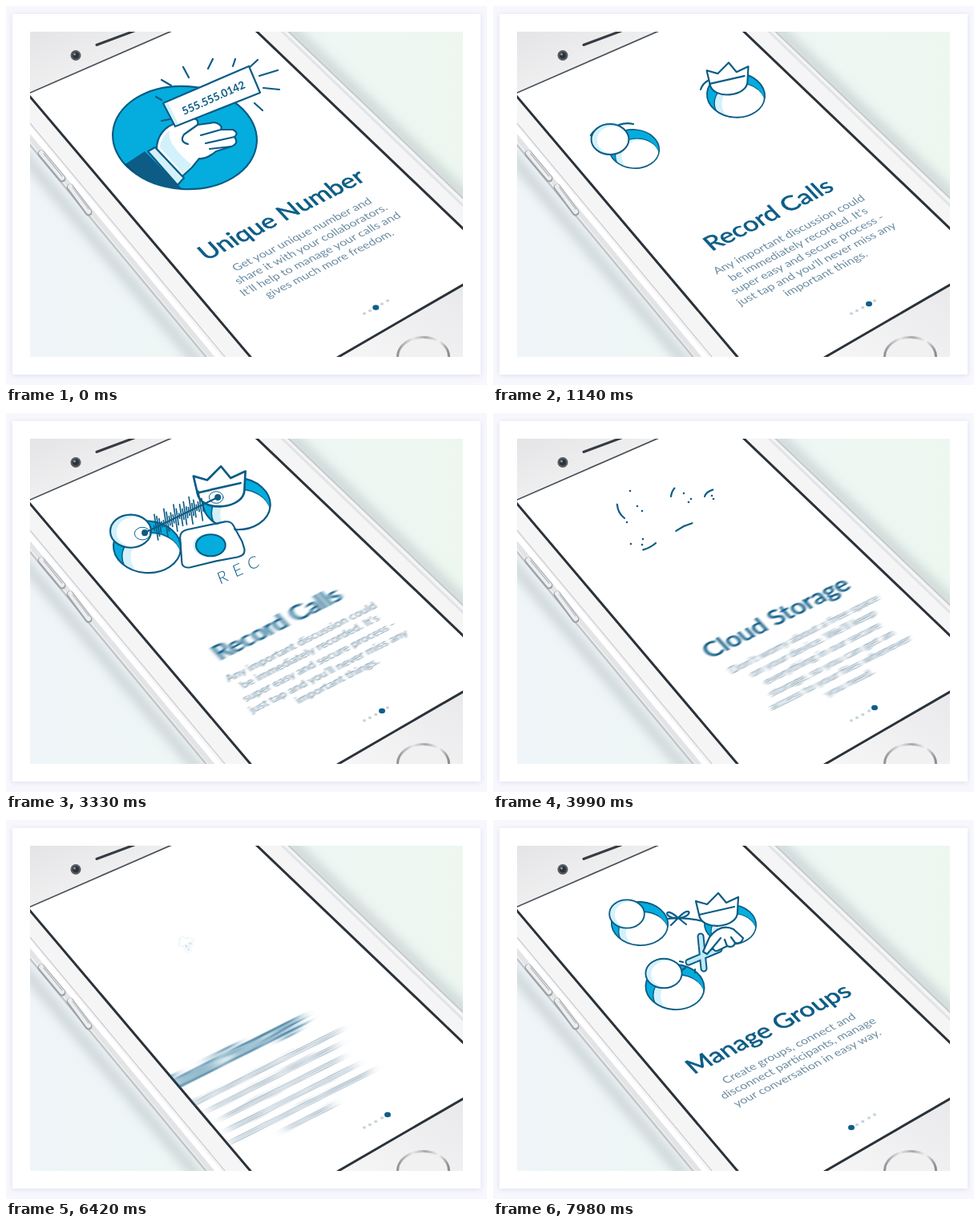
Animation, 600 px wide and 472 px high, one loop 8000 ms. Source, as an HTML page:

```html
<!DOCTYPE html>
<html lang="en">
<head>
<meta charset="utf-8">
<title>Onboarding screens</title>
<style>
html, body { margin: 0; width: 100%; height: 100%; overflow: hidden; background: #f7f7fd; }
svg { display: block; width: 600px; height: 472px; font-family: Lato, "Open Sans", sans-serif; }
.ink { stroke: #0c5c86; stroke-width: 2.2; stroke-linecap: round; stroke-linejoin: round; }
.none { fill: none; }
.white { fill: #fff; }
.pale { fill: #d3f1fa; }
.cyan { fill: #04addd; }
.dark { fill: #0c5c86; }
.title { font-size: 32px; fill: #0c5c86; stroke: #0c5c86; stroke-width: .7; text-anchor: middle; }
.copy { font-size: 15.2px; fill: #6b8ca2; text-anchor: middle; }
</style>
</head>
<body>
<svg viewBox="0 0 600 472" xmlns="http://www.w3.org/2000/svg">
<defs>
  <clipPath id="photo"><rect x="30" y="32" width="540" height="405"/></clipPath>
  <clipPath id="screen"><path d="M30 108 205 32H313L570 277V347L415 437H305L30 113Z"/></clipPath>
  <clipPath id="round"><ellipse rx="43" ry="33" transform="rotate(4)"/></clipPath>
  <clipPath id="disc"><ellipse rx="90" ry="64" transform="translate(223 164) rotate(4)"/></clipPath>
  <linearGradient id="desk"><stop stop-color="#eff5f8"/><stop offset="1" stop-color="#edf7f0"/></linearGradient>
  <linearGradient id="bezel" x1="0" y1="0" x2="1" y2="1"><stop stop-color="#e4e4e6"/><stop offset=".6" stop-color="#f1f1f2"/></linearGradient>
  <linearGradient id="chin" x1="0" y1="1" x2="1" y2="0"><stop stop-color="#f6f6f7"/><stop offset="1" stop-color="#e9e9eb"/></linearGradient>
  <linearGradient id="ring"><stop stop-color="#8f9397"/><stop offset=".3" stop-color="#e6e7e8"/><stop offset=".55" stop-color="#a4a8ab"/><stop offset=".8" stop-color="#f4f4f4"/><stop offset="1" stop-color="#85898d"/></linearGradient>
  <filter id="soft" x="-20%" y="-20%" width="140%" height="140%"><feGaussianBlur stdDeviation="7"/></filter>
  <filter id="lift"><feDropShadow dx="0" dy="1" stdDeviation="3" flood-color="#cfd3e6" flood-opacity=".7"/></filter>

  <g id="body">
    <ellipse class="cyan" rx="43" ry="33" transform="rotate(4)"/>
    <g clip-path="url(#round)">
      <ellipse class="ink pale" cx="5" cy="12" rx="37" ry="30" style="stroke-width:1.6"/>
      <ellipse class="white" cx="11" cy="13" rx="32" ry="28"/>
    </g>
    <ellipse class="ink none" rx="43" ry="33" transform="rotate(4)"/>
  </g>
  <g id="head">
    <ellipse class="pale" rx="26" ry="21"/>
    <ellipse class="white" cx="4" cy="1" rx="22" ry="19"/>
    <ellipse class="ink none" rx="26" ry="21"/>
  </g>
  <g id="king">
    <path class="ink white" d="M-24 5-28-12-14-8 0-22 10-10 25-17 24 1C25 22-21 26-24 5Z"/>
    <path class="ink none" d="M-24 5 20-5"/>
  </g>
</defs>

<rect width="600" height="472" fill="#f7f7fd"/>
<rect x="8" y="10" width="584" height="449" fill="#fff" filter="url(#lift)"/>

<g clip-path="url(#photo)">
  <rect x="30" y="32" width="540" height="405" fill="url(#desk)"/>
  <path d="M10 172 255 462M350 24 590 254" stroke="#aeb7bd" stroke-width="12" fill="none" opacity=".6" filter="url(#soft)"/>
  <path d="M20 20H340L580 249V450H262L20 160Z" fill="#f5f5f6"/>
  <g fill="none">
    <path d="M20 161 262 452" stroke="#c3c6c9" stroke-width="2.5"/>
    <path d="M20 152 268 451" stroke="#e3e4e6" stroke-width="6"/>
    <path d="M20 142 277 452" stroke="#fff" stroke-width="6"/>
    <path d="M20 134 284 450" stroke="#c9ccd0" stroke-width="1.2"/>
    <path d="M340 20 580 249" stroke="#c5cacd" stroke-width="2"/>
    <path d="M332 20 580 258" stroke="#e1e4e6" stroke-width="3"/>
  </g>
  <g stroke-linecap="round">
    <path d="M44 184 70 215M80 226 103 257" stroke="#9ea3a7" stroke-width="9"/>
    <path d="M44 183 70 214M80 225 103 256" stroke="#eceeef" stroke-width="6"/>
    <path d="M47 184 70 212M83 226 103 253" stroke="#b5b9bd" stroke-width="1.2"/>
  </g>
  <path d="M30 32H205L30 108Z" fill="url(#bezel)"/>
  <path d="M415 437 570 347V437Z" fill="url(#chin)"/>
  <path d="M30 108 205 32H313L570 277V347L415 437H305L30 113Z" fill="#fff"/>
  <path d="M28 110.600 307 439.500M311 30 572 279M413 438 572 346" stroke="#2a323a" stroke-width="3" fill="none"/>
  <path d="M28 109 207 31" stroke="#4a525a" stroke-width="1.800"/>
  <path d="M113 48.500 160 31" stroke="#363c42" stroke-width="3" stroke-linecap="round"/>
  <circle cx="87" cy="61.500" r="6.500" fill="#555b61"/>
  <circle cx="87" cy="61.500" r="4" fill="#2d3338"/>
  <circle cx="85.500" cy="60" r="1.500" fill="#8e99a2"/>
  <ellipse cx="520.500" cy="437" rx="32" ry="24.500" fill="#f1f1f2" stroke="url(#ring)" stroke-width="3"/>

  <g clip-path="url(#screen)">
    <g id="copy"></g>
    <g id="dots"></g>

    <g id="card">
      <g class="ink none" id="burst"></g>
      <ellipse class="ink cyan" rx="90" ry="64" transform="translate(223 164) rotate(4)"/>
      <g clip-path="url(#disc)">
        <path class="dark" d="M135 206 173 181 220 228 200 245 145 230Z"/>
        <path d="M135 206 150 196 192 240 150 235Z" fill="#084a70"/>
      </g>
      <path class="ink pale" d="M177 181 186 176 222 214 214 223Z"/>
      <path class="ink white" d="M188 178C188 162 198 150 212 146L232 140Q241 140 239 148L260 145Q271 148 268 154L283 154Q291 158 285 163Q291 171 281 175L262 181Q250 191 241 190L232 201 220 212Z"/>
      <path class="pale" d="M192 176Q193 163 204 155Q200 172 232 198L221 209Z"/>
      <path class="ink none" d="M239 148 222 160Q216 169 227 172M268 154 243 161M285 163 249 171M281 175 254 178"/>
      <path class="ink white" d="M196 121 303 75 317 108 211 150Z"/>
      <path class="pale" d="M198 122 202 120 215 147 212 148Z"/>
      <text class="dark" transform="translate(222 136) rotate(-24)" font-size="13.500" font-weight="700">555.555.0142</text>
      <path class="ink none" d="M194 143 204 141M187 113 194 117" />
    </g>

    <g id="rec">
      <g class="ink none" data-t="900,1000,1300,1450"><path d="M157 148Q166 145 175 147M122 161 125 157M259 104Q261 97 268 93"/></g>
      <use href="#body" id="b1"/><use href="#head" id="h1"/>
      <use href="#body" id="b2"/><use href="#king" id="h2"/>
      <g class="ink" data-t="1600,1800">
        <path class="none" d="M172 149 265 104"/>
        <path id="wave" class="none" style="stroke-width:1.700"/>
        <ellipse class="none" cx="169" cy="150" rx="10" ry="8" style="stroke-width:1"/>
        <ellipse class="none" cx="263" cy="104" rx="9" ry="7.500" style="stroke-width:1"/>
        <circle class="dark" cx="172" cy="149" r="3"/><circle class="dark" cx="265" cy="104" r="3"/>
      </g>
      <path class="white" data-t="1650,1800" d="M218 147 282 135 298 178 221 194Z"/>
      <path class="ink none" data-pen="1650,2260" d="M263 185 230 193Q219 195 219 184L217 155Q217 147 226 145L274 135Q282 134 285 140L296 160 299 170Q300 178 290 180Z"/>
      <g id="lamp"><ellipse class="pale" cx="-3" rx="20" ry="15"/><ellipse class="ink cyan" rx="19" ry="14"/></g>
      <text class="dark" data-t="1850,2050" transform="matrix(.9 -.42 .36 .93 268 215)" font-size="21" font-weight="300" letter-spacing="9">REC</text>
    </g>

    <g id="cloud">
      <g id="c3"><path class="ink white" d="M-16-8 18-20 20 17-16 24Z"/><rect class="dark" x="-12" y="-7" width="18" height="18" transform="rotate(-18)"/></g>
      <g id="c1"><path class="ink white" d="M-27-14 23-27 25 17-24 26Z"/><rect id="chip" class="cyan" x="-11" y="-11" width="22" height="22"/></g>
      <g id="c2"><path class="ink white" d="M-26-13 22-31 25 19-22 27Z"/><rect class="dark" x="-10" y="-5" width="20" height="20" transform="rotate(-16)"/></g>
      <g data-t="4150,4500">
        <path class="pale" d="M178 172C160 175 146 164 147 150C148 138 157 132 164 131C150 120 152 98 170 87C190 77 214 85 220 100C226 86 252 81 263 100C272 92 292 92 298 102C303 112 296 119 288 123L203 161Z"/>
        <path class="white" d="M184 167C162 170 154 156 160 143Q166 133 176 133C158 118 162 96 182 89C202 82 216 92 222 108C230 90 254 86 264 104C274 94 290 94 297 103C302 112 296 117 287 122L203 160Z"/>
        <path class="ink none" style="stroke-dasharray:9 4 14 4" d="M167 117C161 103 171 94 187 92M160 161Q153 150 164 141M230 107Q230 96 243 94M272 107Q272 101 280 100"/>
      </g>
      <g class="ink none">
        <path data-pen="3800,4500" d="M164 131C150 120 152 98 170 87C190 77 214 85 220 100"/>
        <path data-pen="3800,4450" d="M222 104C224 84 252 81 263 100"/>
        <path data-pen="3800,4450" d="M264 104C268 92 292 92 298 102C303 112 296 119 288 123"/>
        <path data-pen="3800,4500" d="M203 162C185 178 147 176 147 150C148 138 157 132 164 131"/>
        <path data-pen="3800,4350" d="M238 141 203 162"/>
        <path data-pen="3800,4450" d="M238 141 288 123"/>
        <path data-t="5080,5200,5350,5500" d="M199 237V240M222 243V250"/>
      </g>
      <g id="specks" class="dark" data-t="3800,3930,4080,4250"></g>
    </g>

    <g id="group">
      <g class="ink none" data-t="7350,7500">
        <path d="M212 124Q236 119 266 127M231 122 222 131M231 122 241 130"/>
        <path class="pale" d="M231 122C213 105 212 124 231 122C247 104 251 121 231 122Z"/>
      </g>
      <use href="#body" id="b3"/><use href="#head" id="h3"/>
      <use href="#body" id="b4"/><use href="#head" id="h4"/>
      <use href="#body" id="b5"/><use href="#king" id="h5"/>
      <g id="snip">
        <g fill="none" stroke-linecap="round">
          <path d="M18-3-20 13M-5-19-1 21" stroke="#0c5c86" stroke-width="9"/>
          <path d="M18-3-20 13M-5-19-1 21" stroke="#bfeaf6" stroke-width="5"/>
        </g>
        <path class="ink white" d="M-2 0 6-18Q20-36 36-28L48-17Q46-9 38-11Q36-4 28-7L18-2Q12 1 10-5L3 3Z"/>
        <path class="ink none" d="M10-5 20-17M28-7 25-15M38-11 33-18M-24 20-28 23M-27 13-31 12M-12 22-12 26"/>
      </g>
    </g>
  </g>
</g>
</svg>

<script>
const LOOP = 8000;
const SVG = "http://www.w3.org/2000/svg";
const $ = id => document.getElementById(id);
const ramp = (t, a, b) => Math.min(1, Math.max(0, (t - a) / (b - a)));
const smooth = p => p * p * (3 - 2 * p);

function make(parent, tag, attrs, text) {
  const el = document.createElementNS(SVG, tag);
  for (const k in attrs) el.setAttribute(k, attrs[k]);
  if (text) el.textContent = text;
  return parent.appendChild(el);
}

const pages = [
  { dot: 2, from: -3000, to: 30, title: "Unique Number", lines: ["Get your unique number and", "share it with your collaborators.", "It’ll help to manage your calls and", "gives much more freedom."] },
  { dot: 3, from: 30, to: 3270, title: "Record Calls", lines: ["Any important discussion could", "be immediately recorded. It’s", "super easy and secure process -", "just tap and you’ll never miss any", "important things."] },
  { dot: 4, from: 3270, to: 6210, title: "Cloud Storage", lines: ["Don’t worry about a free space", "on your device. We’ll keep", "everything in our secure", "storage, so you can get an", "access to your files whenever", "you need."] },
  { dot: 0, from: 6210, to: 12000, title: "Manage Groups", lines: ["Create groups, connect and", "disconnect participants, manage", "your conversation in easy way."] }
];

// Each page has a title block and a copy block that slides a little later.
const blocks = [];
function addBlock(page, lag, cls, lines, y) {
  const id = "blur" + blocks.length;
  const filter = make(document.querySelector("defs"), "filter", { id, x: "-30%", y: "-20%", width: "160%", height: "140%" });
  const blur = make(filter, "feGaussianBlur", { stdDeviation: "0 0" });
  const el = make($("copy"), "g", { class: cls });
  lines.forEach((s, i) => make(el, "text", { x: lag * 2, y: y + 19 * i }, s));
  blocks.push({ page, lag, id, blur, el });
}
for (const p of pages) {
  addBlock(p, 0, "title", [p.title], 0);
  addBlock(p, 1, "copy", p.lines, 34);
}

const dots = [[447, 383], [454, 379.5], [461.300, 375.500], [469, 371], [476, 367]]
  .map(([cx, cy]) => make($("dots"), "ellipse", { cx, cy }));

[[194, 92, 206, 99], [221, 76, 228, 89], [252, 78, 258, 66], [283, 75, 286, 66],
 [301, 79, 314, 67], [316, 87, 339, 80], [321, 102, 341, 104], [310, 121, 320, 130]]
  .forEach(([x1, y1, x2, y2]) => make($("burst"), "line", { x1, y1, x2, y2 }));

[[171, 97], [180, 116], [186, 122], [167, 136], [238, 100], [247, 107], [244, 111],
 [273, 103], [275, 107], [172, 163], [187, 157], [186, 164]]
  .forEach(([cx, cy]) => make($("specks"), "circle", { cx, cy, r: 1.300 }));

// time, x, y, scale
const moves = {
  b1: [[750, 176, 182, 0], [1140, 176, 178, .73], [1600, 175, 167, 1]],
  h1: [[780, 160, 176, 0], [1140, 146, 166, .9], [1600, 154, 147, 1]],
  b2: [[750, 303, 116, 0], [1140, 303, 111, .84], [1600, 289, 112, 1]],
  h2: [[780, 298, 104, 0], [1140, 294, 92, .98], [1600, 269, 92, 1.250]],
  lamp: [[1700, 256, 165, 0], [1950, 256, 165, 1.100], [2060, 256, 165, 1]],
  c3: [[4480, 262, 116, .5], [4850, 266, 145, 1]],
  c2: [[4620, 222, 132, .5], [5050, 224, 165, 1]],
  c1: [[4750, 240, 140, .5], [5200, 246, 204, 1]],
  b3: [[6850, 200, 146, 0], [6990, 200, 143, .24], [7500, 183, 129, .82]],
  h3: [[6850, 197, 142, 0], [6990, 196, 138, .24], [7500, 167, 117, .84]],
  b4: [[6700, 242, 220, 0], [6990, 241, 214, .45], [7400, 227, 208, .85]],
  h4: [[6700, 238, 212, 0], [6990, 236, 205, .48], [7400, 213, 191, .87]],
  b5: [[6960, 310, 150, 0], [6990, 310, 150, .08], [7500, 296, 130, .75]],
  h5: [[6960, 309, 149, 0], [6990, 309, 149, .06], [7500, 281, 113, 1]],
  snip: [[7480, 280, 150, 0], [7720, 266, 164, 1.060], [7800, 264, 164, 1]]
};

function pose(keys, t) {
  let i = 0;
  while (i < keys.length - 2 && t > keys[i + 1][0]) i++;
  const a = keys[i], b = keys[i + 1];
  const p = smooth(ramp(t, a[0], b[0]));
  return a.map((v, k) => v + (b[k] - v) * p);
}

const scenes = [["card", -1, 30], ["rec", 700, 3270], ["cloud", 3780, 6030], ["group", 6650, 9000]];
const fades = [...document.querySelectorAll("[data-t]")].map(el => [el, el.dataset.t.split(",").map(Number)]);
const pens = [...document.querySelectorAll("[data-pen]")].map(el => {
  el.setAttribute("pathLength", 1);
  return [el, el.dataset.pen.split(",").map(Number)];
});

function drawCopy(t) {
  for (const { page, lag, id, blur, el } of blocks) {
    const start = page.from + 200 + 50 * lag;
    const p = ramp(t, start, start + 780 + 20 * lag);
    const q = ramp(t, page.to + 30 * lag, page.to + 30 * lag + 430);
    const x = 300 * (1 - p) ** 3 - 300 * q * q;
    const speed = 1.150 * (1 - p) ** 2 + 1.400 * q;
    el.style.display = p > 0 && q < 1 ? "" : "none";
    el.setAttribute("transform", `matrix(.895 -.45 .6 .64 ${350 + x * .895} ${267 - x * .45})`);
    blur.setAttribute("stdDeviation", `${speed * 14} 0`);
    if (speed > .02) el.setAttribute("filter", `url(#${id})`);
    else el.removeAttribute("filter");
  }
  dots.forEach((dot, i) => {
    const on = pages.reduce((sum, p) => sum + (p.dot === i ? ramp(t, p.from + 250, p.from + 450) - ramp(t, p.to + 250, p.to + 450) : 0), 0);
    dot.setAttribute("rx", 2.100 + 1.900 * on);
    dot.setAttribute("ry", 1.800 + 1.500 * on);
    dot.setAttribute("fill", on > .5 ? "#0f5f89" : "#c6d4dc");
  });
}

function drawWave(t) {
  let d = "";
  for (let i = 0; i < 26; i++) {
    const u = .13 + .66 * i / 25;
    const x = 172 + 93 * u, y = 149 - 45 * u;
    const h = 3 + 16 * Math.abs(Math.sin(i * 1.900) * Math.cos(i * .7 + (t - 2100) / 150));
    d += `M${x - h * .15} ${y - h}L${x + h * .15} ${y + h}`;
  }
  $("wave").setAttribute("d", d);
}

function draw(t) {
  drawCopy(t);
  for (const [id, from, to] of scenes) {
    const s = 1 - ramp(t, to, to + 420) ** 2;
    const el = $(id);
    el.style.display = t >= from && s > 0 ? "" : "none";
    el.setAttribute("transform", `translate(225 155) scale(${s}) translate(-225 -155)`);
    el.style.opacity = Math.min(1, s * 1.500);
  }
  for (const id in moves) {
    const [, x, y, s] = pose(moves[id], t);
    const el = $(id);
    const hidden = t < moves[id][0][0] || s < .01;
    el.style.display = hidden ? "none" : "";
    el.style.opacity = Math.min(1, .15 + s * 1.900);
    const beat = id === "lamp" && t > 2460 ? .94 + .06 * Math.cos((t - 2460) / 125) : 1;
    el.setAttribute("transform", `translate(${x} ${y}) scale(${s * beat})`);
  }
  const chip = .7 + .3 * smooth(ramp(t, 5000, 5300)) + .08 * Math.sin(Math.PI * ramp(t, 5300, 5850));
  $("chip").setAttribute("transform", `rotate(-14) scale(${chip})`);
  for (const [el, [a, b, c = 1e5, d = 2e5]] of fades) el.style.opacity = ramp(t, a, b) - ramp(t, c, d);
  for (const [el, [a, b]] of pens) {
    const p = smooth(ramp(t, a, b));
    el.style.visibility = p > 0 ? "visible" : "hidden";
    el.style.strokeDasharray = p < 1 ? `${p} 2` : "none";
  }
  drawWave(t);
}

const start = performance.now();
function tick(now) {
  draw(Math.max(0, now - start) % LOOP);
  requestAnimationFrame(tick);
}
draw(0);
requestAnimationFrame(tick);
</script>
</body>
</html>
```
